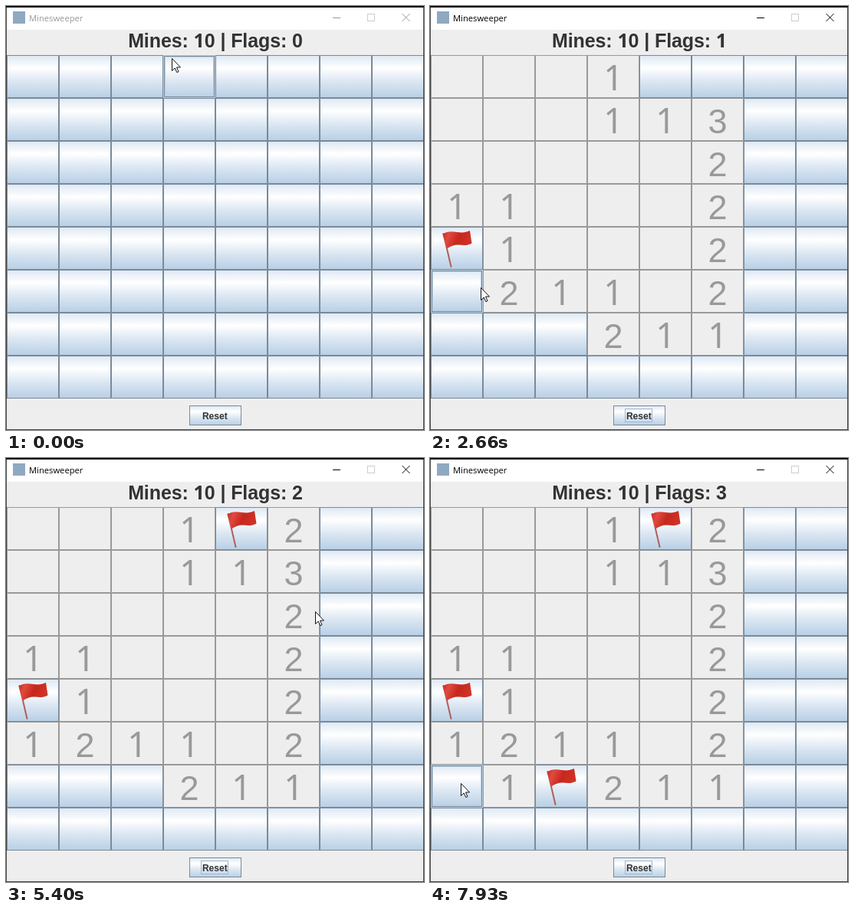
Recreate the animation shown at these times as an HTML page. Size 545 by 553 pixels, loop 8000 ms.

```html
<!DOCTYPE html>
<html lang="en">
<head>
<meta charset="utf-8">
<title>Minesweeper</title>
<style>
  html, body { margin: 0; width: 100%; height: 100%; overflow: hidden; background: #eee; }
  svg { display: block; width: 545px; height: 553px; }
  text { font-family: "Liberation Sans", Arial, sans-serif; }
  .bold { font-weight: bold; fill: #333; text-anchor: middle; }
  .digit { font-size: 45px; fill: #999; text-anchor: middle; }
  .one { font-family: "Noto Sans", sans-serif; } /* a 1 without a foot */
  .title { font: 11.2px "Open Sans", sans-serif; }
  .crisp { shape-rendering: crispEdges; }
</style>
</head>
<body>
<svg viewBox="0 0 545 553" xmlns="http://www.w3.org/2000/svg">
  <defs>
    <linearGradient id="metal" x2="0" y2="1">
      <stop offset="0" stop-color="#dde8f3"/>
      <stop offset=".3" stop-color="#fff"/>
      <stop offset=".6" stop-color="#dde8f3"/>
      <stop offset="1" stop-color="#b8cfe5"/>
    </linearGradient>
    <linearGradient id="cloth" x2="1" y2=".25">
      <stop offset="0" stop-color="#c4291f"/>
      <stop offset=".25" stop-color="#e04a3f"/>
      <stop offset=".6" stop-color="#c7271d"/>
      <stop offset="1" stop-color="#cf3227"/>
    </linearGradient>
    <g id="flag">
      <path d="M16.500 9L26.500 52" fill="none" stroke="#b0605a" stroke-width="2" stroke-linecap="round"/>
      <path d="M15.500 9.500C22 5 28 6 35 7S46 7 51 5L53.500 21.500C47 25 42 24 37 23.500S27 24 21 28.500Z" fill="url(#cloth)"/>
    </g>
  </defs>
  <rect width="545" height="553" fill="#eee"/>
  <rect width="545" height="31" fill="#fff"/>
  <rect x="9" y="7" width="16" height="16" fill="#8fa9c0"/>
  <text id="title" class="title" x="30" y="20">Minesweeper</text>
  <g fill="none">
    <path id="minimise" class="crisp" d="M426 15.500H436"/>
    <rect class="crisp" x="471.500" y="10.500" width="9" height="9" stroke="#ccc"/>
    <path id="close" d="M516.500 10L526.500 20M526.500 10L516.500 20"/>
  </g>
  <text class="bold" x="273" y="54" font-size="25" letter-spacing="-.1">Mines: <tspan class="one">1</tspan>0 | Flags: <tspan id="count">0</tspan></text>
  <g id="board"></g>
  <rect class="crisp" x="239.500" y="521.500" width="67" height="25" fill="url(#metal)" stroke="#7a8a99"/>
  <rect id="focus" class="crisp" x="254.500" y="525.500" width="35" height="17" fill="none" stroke="#a3b8cc"/>
  <text class="bold" x="272.300" y="539" font-size="12">Reset</text>
  <path class="crisp" d="M.5 0V552.500H544.500V0" stroke="#444" fill="none"/>
  <rect width="545" height="2" fill="#111"/>
  <path id="cursor" d="M.5 .5V16.500L4.200 13L6.800 18.600L9 17.600L6.500 12H11.500Z" fill="#fff" stroke="#111"/>
</svg>
<script>
const LOOP = 8000, STEPS = 120, SIZE = 8;
const CELL_W = 68, CELL_H = 56, LEFT = 1, TOP = 64;

const mines = ['4,0', '7,0', '6,1', '6,2', '0,4', '6,4', '6,5', '2,6', '3,7', '7,7'];

// each move: first step, last step, x, y, and what is clicked on arrival
const moves = [
  [0, 0, 216, 68],
  [4, 7, 427, 192],
  [10, 20, 308, 244, 'open'],
  [20, 23, 306, 237],
  [23, 34, 40, 331],
  [35, 37, 44, 333, 'flag'],
  [37, 40, 66, 367],
  [40, 43, 60, 374, 'open'],
  [43, 48, 63, 420],
  [63, 69, 472, 110],
  [69, 73, 290, 88, 'flag'],
  [75, 78, 355, 92, 'open'],
  [78, 81, 403, 200],
  [84, 91, 438, 84],
  [93, 101, 250, 403],
  [101, 104, 160, 436, 'flag'],
  [106, 110, 104, 438, 'open'],
  [110, 114, 36, 468],
  [114, 119, 40, 424]
];
const firstClick = moves.find(m => m[4])[1];

const $ = id => document.getElementById(id);
const show = (el, on) => el.setAttribute('visibility', on ? 'visible' : 'hidden');
const ease = k => k * k * (3 - 2 * k);

function add(parent, tag, attrs = {}) {
  const el = document.createElementNS('http://www.w3.org/2000/svg', tag);
  for (const key in attrs) el.setAttribute(key, attrs[key]);
  parent.appendChild(el);
  return el;
}

function setDigit(el, n) {
  el.textContent = n || '';
  el.classList.toggle('one', n === 1);
}

function frame(parent, inset, stroke, fill = 'none') {
  return add(parent, 'rect', {
    class: 'crisp', x: inset + 0.5, y: inset + 0.5,
    width: CELL_W - 1 - 2 * inset, height: CELL_H - 1 - 2 * inset, fill, stroke
  });
}

function makeCell(col, row) {
  const g = add($('board'), 'g', {
    transform: `translate(${LEFT + col * CELL_W} ${TOP + row * CELL_H})`
  });
  const cell = {
    col, row, openAt: Infinity, flagAt: Infinity,
    mine: mines.includes(`${col},${row}`),
    face: frame(g, 0, '#7a8a99', 'url(#metal)'),
    hover: add(g, 'g'),
    flag: add(g, 'use', { href: '#flag' }),
    digit: add(g, 'text', { class: 'digit', x: CELL_W / 2, y: 46 })
  };
  ['#b8cfe5', '#7a8a99', '#b8cfe5'].forEach((stroke, inset) => frame(cell.hover, inset, stroke));
  return cell;
}

const cells = Array.from({ length: SIZE * SIZE }, (_, i) => makeCell(i % SIZE, Math.floor(i / SIZE)));

const near = cell => cells.filter(c =>
  c !== cell && Math.abs(c.col - cell.col) < 2 && Math.abs(c.row - cell.row) < 2);

const cellAt = (x, y) => cells.find(c =>
  c.col === Math.floor((x - LEFT) / CELL_W) && c.row === Math.floor((y - TOP) / CELL_H));

// an empty field opens its neighbours too
function open(cell, step) {
  if (cell.openAt < Infinity) return;
  cell.openAt = step;
  const count = near(cell).filter(c => c.mine).length;
  setDigit(cell.digit, count);
  if (!count) near(cell).forEach(c => open(c, step));
}

for (const [, step, x, y, action] of moves) {
  if (action === 'open') open(cellAt(x, y), step);
  if (action === 'flag') cellAt(x, y).flagAt = step;
}

function pointerAt(step) {
  let x = 0, y = 0;
  for (const [from, to, x1, y1] of moves) {
    if (step < from) break;
    const k = step >= to ? 1 : ease((step - from) / (to - from));
    x += (x1 - x) * k;
    y += (y1 - y) * k;
  }
  return [Math.round(x), Math.round(y)];
}

function draw(ms) {
  // fifteen pictures a second, times rounded down to 10 ms
  const step = Math.floor((ms + 7) * STEPS / LOOP) % STEPS;
  const [x, y] = pointerAt(step);
  const under = cellAt(x, y);

  for (const c of cells) {
    const opened = step >= c.openAt;
    c.face.setAttribute('fill', opened ? '#eee' : 'url(#metal)');
    c.face.setAttribute('stroke', opened ? '#999' : '#7a8a99');
    show(c.hover, !opened && c === under);
    show(c.flag, step >= c.flagAt);
    show(c.digit, opened);
  }

  const active = step >= firstClick, ink = active ? '#000' : '#999';
  $('title').setAttribute('fill', ink);
  $('minimise').setAttribute('stroke', ink);
  $('close').setAttribute('stroke', ink);
  show($('focus'), active);

  const flagged = cells.filter(c => step >= c.flagAt).length;
  setDigit($('count'), flagged);
  if (!flagged) $('count').textContent = '0';
  $('cursor').setAttribute('transform', `translate(${x} ${y})`);
}

const start = performance.now();
function tick() {
  draw((performance.now() - start) % LOOP);
  requestAnimationFrame(tick);
}
tick();
</script>
</body>
</html>
```
